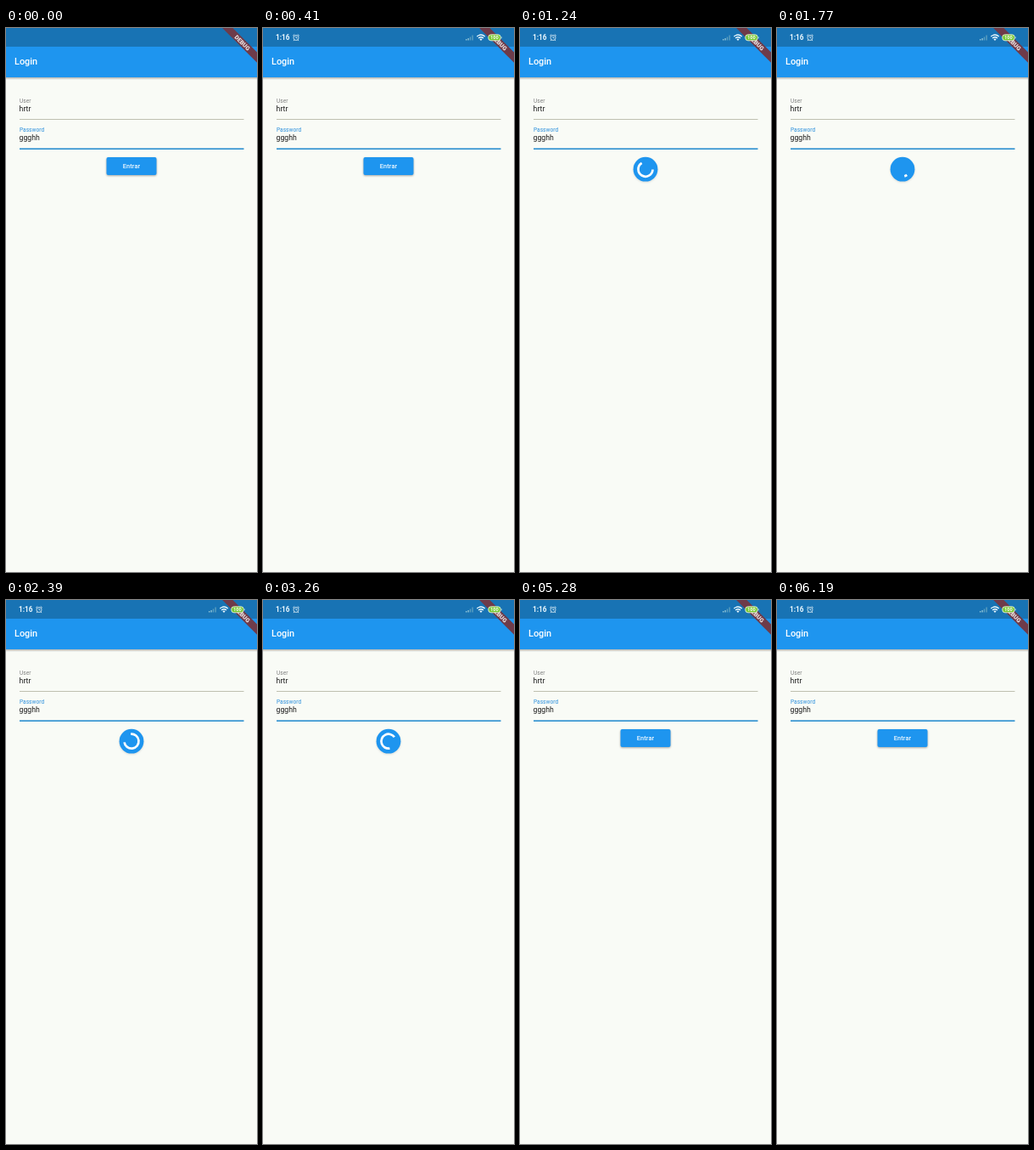
These frames come from a looping animation (296x640 px, 6.24 s). An HTML page:

```html
<!DOCTYPE html>
<html lang="en">
<head>
<meta charset="utf-8">
<title>Login form</title>
<style>
  html, body { margin: 0; width: 100%; height: 100%; overflow: hidden; background: #f9fbf6; }
  svg { display: block; width: 296px; height: 640px; font-family: Roboto, "Liberation Sans", sans-serif; }
  .bar { fill: #1e95ef; }
  .label { font-size: 6.5px; letter-spacing: .05px; }
  .value { font-size: 8.7px; fill: #1c1c1c; }
  #button rect { filter: drop-shadow(0 1px .8px #0005); }
  #loader .bar { filter: drop-shadow(0 1px 1px #0002); }
</style>
</head>
<body>
<svg viewBox="0 0 296 640">
  <defs>
    <linearGradient id="shade" x2="0" y2="1">
      <stop stop-color="#505050" stop-opacity=".5"/>
      <stop offset="1" stop-color="#505050" stop-opacity="0"/>
    </linearGradient>
  </defs>
  <rect width="296" height="640" fill="#f9fbf6"/>
  <rect y="57.5" width="296" height="3.5" fill="url(#shade)"/>
  <rect class="bar" width="296" height="58"/>
  <rect width="296" height="22" fill="#1873b4"/>
  <text x="10" y="43.3" font-size="10.9" font-weight="500" fill="#fff">Login</text>

  <text class="label" x="16" y="87.5" fill="#808080">User</text>
  <text class="value" x="15.6" y="98">hrtr</text>
  <rect x="16" y="107" width="264.5" height="1" fill="#bfc0b0"/>
  <text class="label" x="16" y="122" fill="#2b8fdc">Password</text>
  <text class="value" x="15.6" y="132.3">ggghh</text>
  <rect x="16" y="141.4" width="264.5" height="1.6" fill="#2b8fd0"/>

  <g id="button">
    <rect class="bar" x="118.5" y="152" width="59" height="21" rx="2"/>
    <text x="148" y="165.3" font-size="7.4" font-weight="500" letter-spacing=".15" text-anchor="middle" fill="#f2faff">Entrar</text>
  </g>
  <g id="loader">
    <circle class="bar" cx="148" cy="166.2" r="14.4"/>
    <path id="arc" fill="none" stroke="#fff" stroke-width="2.7"/>
  </g>

  <g transform="translate(296) rotate(45)">
    <rect x="-29" y="20.2" width="58" height="8.7" fill="#6e3b4a"/>
    <text y="27" font-size="7" font-weight="900" text-anchor="middle" fill="#f0e6e4">DEBUG</text>
  </g>

  <g id="status" fill="#eefaff">
    <text x="15" y="14.3" font-size="8.2" font-weight="700">1:16</text>
    <g fill="none" stroke="#d5e8f2" stroke-width=".9">
      <circle cx="39" cy="11.5" r="3"/>
      <path d="M35.2 9.2l2-1.7M42.8 9.2l-2-1.7M39 9.7v2h1.4M37 13.8l-1 1.3M41 13.8l1 1.3"/>
    </g>
    <path d="M239 13h1.4v1.5H239zM241.4 12h1.4v2.5h-1.4z" fill="#8fc4d8"/>
    <path d="M243.8 10.5h1.4v4h-1.4zM246.4 8.5h1.4v6h-1.4z" fill="#5c9fc0"/>
    <g fill="none" stroke="#eefaff" stroke-width="1.3">
      <path d="M252.3 10Q257 6 261.7 10M254 12Q257 9.4 260 12"/>
    </g>
    <path d="M255.3 13.1Q257 11.8 258.7 13.1L257 15z"/>
    <rect x="265.8" y="7.8" width="14.4" height="7" rx="3" fill="#77c832" stroke="#eef5df" stroke-width=".9"/>
    <path d="M281 9.8q1.2 1.5 0 3z"/>
    <text x="273" y="13.4" font-size="5.7" font-weight="700" text-anchor="middle" fill="#fff">100</text>
  </g>
</svg>
<script>
  const LOOP = 6240, STATUS_ON = 40, LOAD_ON = 940, LOAD_OFF = 3940, TURN = 1000;
  const $ = id => document.getElementById(id);

  // cubic-bezier(.4, 0, .2, 1), solved by bisection
  function ease(x) {
    x = Math.min(1, Math.max(0, x));
    let lo = 0, hi = 1;
    for (let i = 0; i < 20; i++) {
      const m = (lo + hi) / 2, n = 1 - m;
      if (1.2 * n * n * m + .6 * n * m * m + m ** 3 < x) lo = m; else hi = m;
    }
    return lo * lo * (3 - 2 * lo);
  }

  // The head runs ahead in the first half of a turn, the tail follows in the second.
  function arcPath(time, r = 8.5) {
    const step = Math.floor(time / TURN), phase = time / TURN - step;
    const head = 270 * ease(phase * 2), tail = 270 * ease(phase * 2 - 1);
    const start = tail + 306 * phase - 144 * step;
    const sweep = Math.max(head - tail, .1);
    const point = deg => {
      const a = deg * Math.PI / 180;
      return `${148 + r * Math.sin(a)} ${166.2 - r * Math.cos(a)}`;
    };
    return `M${point(start)}A${r} ${r} 0 ${+(sweep > 180)} 1 ${point(start + sweep)}`;
  }

  const show = (id, on) => $(id).style.display = on ? "" : "none";

  function draw(now) {
    const t = now % LOOP;
    const loading = t >= LOAD_ON && t < LOAD_OFF;
    show("status", t >= STATUS_ON);
    show("button", !loading);
    show("loader", loading);
    if (loading) $("arc").setAttribute("d", arcPath(t - LOAD_ON));
  }

  const start = performance.now();
  function tick() {
    draw(performance.now() - start);
    requestAnimationFrame(tick);
  }
  tick();
</script>
</body>
</html>
```
